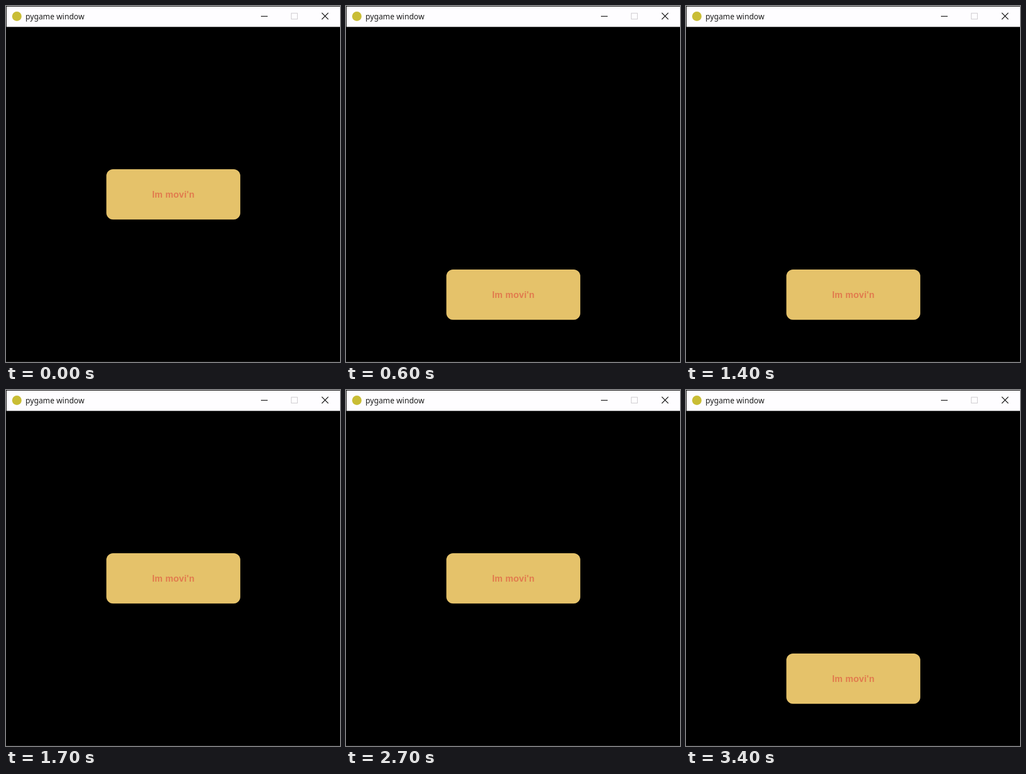
An HTML page for the animation above (3.5 s loop, 600 by 639 pixels).

```html
<!DOCTYPE html>
<html lang="en">
<head>
<meta charset="utf-8">
<title>pygame window</title>
<style>
  html, body { margin: 0; width: 100%; height: 100%; overflow: hidden; background: #000; }
  svg { display: block; width: 100%; height: 100%; }
  .title { font: 13.75px "Noto Sans", sans-serif; fill: #1c1c1c; }
  .label { font: bold 16px "Liberation Sans", Arial, sans-serif; letter-spacing: .25px; fill: #e17b4e; }
</style>
</head>
<body>
<svg viewBox="0 0 600 639">
  <rect width="600" height="639" fill="#000"/>
  <rect y="638" width="600" height="1" fill="#181818"/>

  <rect x="1" y="1" width="599" height="36.5" fill="#fefdff"/>
  <circle cx="19.5" cy="18.5" r="8.5" fill="#c9bd35"/>
  <text class="title" x="35" y="24">pygame window</text>
  <g fill="none" stroke="#1a1a1a" stroke-width="1.3">
    <path d="M458 18.5H470"/>
    <rect x="512.5" y="13" width="11" height="10.5" stroke="#cfcdd0" stroke-width="1.1"/>
    <path d="M567.3 12.3L579 24M579 12.3L567.3 24"/>
  </g>

  <g id="button">
    <rect x="180.3" y="293" width="240.6" height="90.2" rx="12" fill="#e5c26a"/>
    <text class="label" x="262.4" y="344">Im movi'n</text>
  </g>
</svg>
<script>
  const LOOP = 3500, DROP = 180;
  const toggles = [200, 700, 1200, 1700, 2200, 2700, 3300];
  const button = document.getElementById("button");

  // The button jumps between two heights at every toggle.
  function draw(time) {
    const t = time % LOOP;
    const low = toggles.filter(at => t >= at).length % 2;
    button.setAttribute("transform", `translate(0 ${low * DROP})`);
  }

  const start = performance.now();
  function tick() {
    draw(performance.now() - start);
    requestAnimationFrame(tick);
  }
  tick();
</script>
</body>
</html>
```
